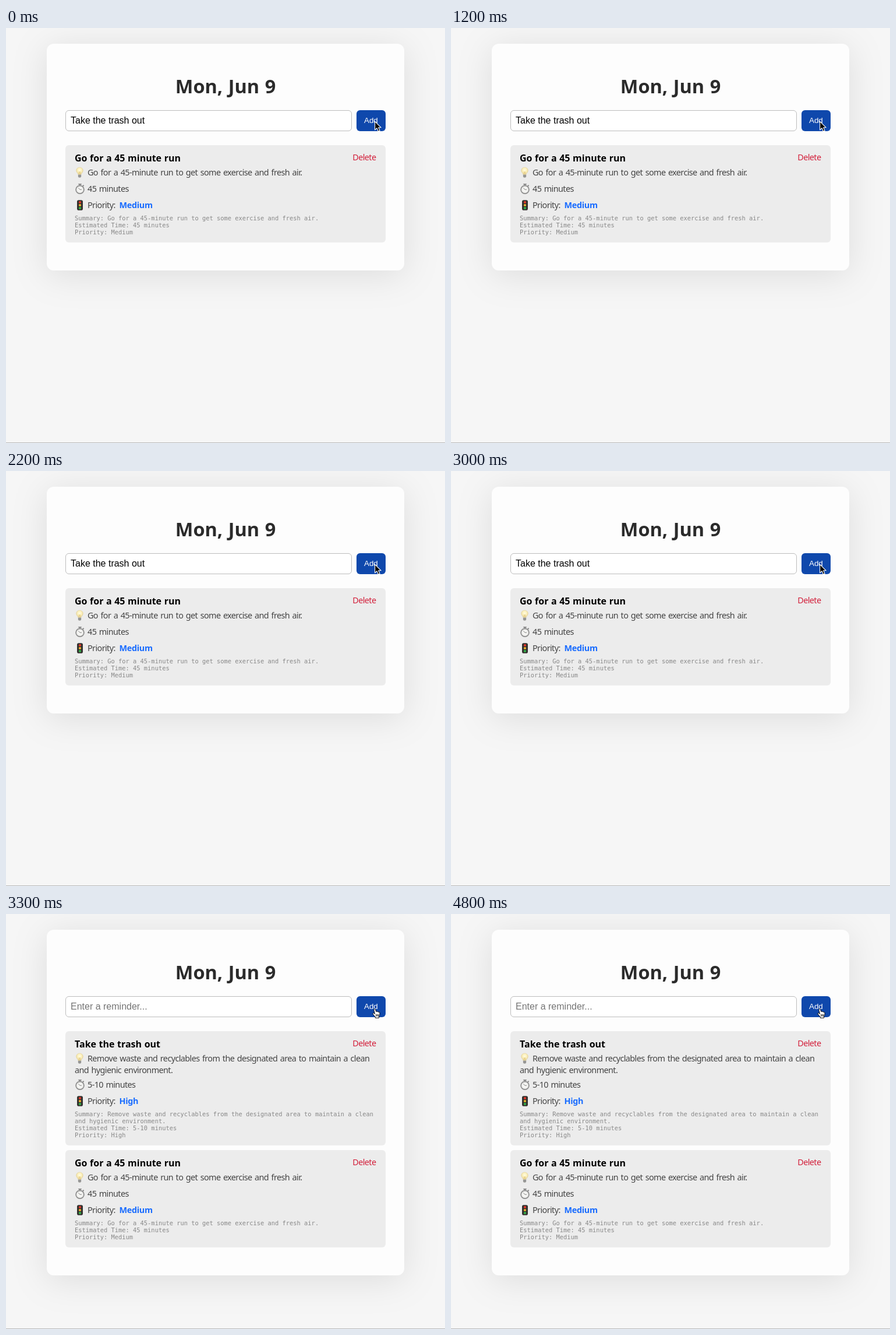
Animation of 754 by 712 pixels, one loop 4900 ms. Source, as an HTML page:

```html
<!DOCTYPE html>
<html lang="en">
<head>
<meta charset="utf-8">
<title>Reminders</title>
<style>
html, body { margin: 0; width: 100%; height: 100%; overflow: hidden; background: #f6f6f6; }
svg { display: block; width: 754px; height: 712px; }
text { font-family: "Noto Sans", sans-serif; }
.date { font-size: 32.5px; font-weight: 700; fill: #2b2b2b; word-spacing: .033em; text-anchor: middle; }
.title { font-size: 16px; font-weight: 700; word-spacing: .4px; }
.body, .delete { font-size: 14.4px; fill: #444; letter-spacing: -.042em; word-spacing: .095em; }
.delete { fill: #d3213c; }
.level { font-size: 14.4px; font-weight: 700; fill: #196cff; letter-spacing: -.022em; }
.raw { font: 10.4px "DejaVu Sans Mono", monospace; fill: #888; }
.field, .placeholder { font: 16px "Liberation Sans", Arial, sans-serif; }
.placeholder { fill: #757575; }
.add { font: 13.33px "Liberation Sans", Arial, sans-serif; fill: #fff; }
.card { fill: #fdfdfd; filter: drop-shadow(0 8px 30px rgba(0, 0, 0, .1)); }
</style>
</head>
<body>
<svg id="stage" viewBox="0 0 754 712">
  <defs>
    <radialGradient id="glow" cy=".4">
      <stop offset="0" stop-color="#fffbe0"/>
      <stop offset=".6" stop-color="#fcf1bd"/>
      <stop offset="1" stop-color="#ead9a0"/>
    </radialGradient>
    <g id="bulb">
      <path d="M5.8 12.5C5.6 9.8 2.6 8.8 2.6 5.2a5.9 5.2 0 0 1 11.8 0C14.4 8.8 11.4 9.8 11.2 12.5Z" fill="url(#glow)" stroke="#dfcf9c" stroke-width=".5"/>
      <path d="M7.5 12V7.5l1 1 1-1V12" fill="none" stroke="#d9b860" stroke-width=".6"/>
      <path d="M5.9 12.5h5.2v3.6l-1.2 1.7H7.1l-1.2-1.7Z" fill="#a5a5a2"/>
      <path d="M5.9 14h5.2M5.9 15.7h5.2" stroke="#777" stroke-width=".6"/>
    </g>
    <g id="watch">
      <path d="M9 3V1M14 4.2l1.6-1.4" stroke="#858585" stroke-width="2"/>
      <path d="M6.8.9h4.4" stroke="#777" stroke-width="1.5" stroke-linecap="round"/>
      <circle cx="9" cy="10.2" r="6.9" fill="#f5f5f3" stroke="#8b8b8b" stroke-width="1.7"/>
      <circle cx="9" cy="10.2" r="5" fill="none" stroke="#aaa" stroke-width=".8" stroke-dasharray=".6 2.02"/>
      <path d="M9 10.2 6.2 7.4M9 10.2h3" stroke="#666" stroke-width=".8"/>
    </g>
    <g id="light">
      <rect x="4" y=".3" width="10" height="17.4" rx="2.8" fill="#34322f"/>
      <circle cx="9" cy="4" r="2.1" fill="#e8392b"/>
      <circle cx="9" cy="9" r="2.1" fill="#f0b52e"/>
      <circle cx="9" cy="14" r="2.1" fill="#35b54a"/>
    </g>
  </defs>
  <rect width="754" height="712" fill="#f6f6f6"/>
  <rect y="711" width="754" height="1" fill="#b8b8b8"/>
  <g id="before"></g>
  <g id="after"></g>
  <text class="date" x="377" y="112">Mon, Jun 9</text>
  <rect id="button" x="602" y="141" width="50" height="36" rx="6" fill="#0f48ac"/>
  <text class="add" x="615" y="163">Add</text>
  <path id="arrow" d="M633.6 160.3V174.8L637 171.7 639.3 177.3 642 176.2 639.7 170.8H644.2Z" fill="#000" stroke="#fff" stroke-width="1.1" stroke-linejoin="round"/>
  <path id="hand" d="M632 163.6c.9-1.4 2.4-.7 2.7.5l.9 3.5c.7-.9 2-.7 2.3.3.8-.6 1.9-.3 2.1.6 1-.4 2 .2 2 1.3 0 2.7-.5 4.1-1.4 5.6v2.9h-6.3v-1.6c-1.4-1.6-2.5-3.2-4.1-5-.9-1.2.5-2.5 1.9-1.5l1.4 1.2-1.6-6.3c-.1-.6-.1-1.1.1-1.5ZM635.7 172v3.6M637.6 172v3.6M639.5 172v3.6" fill="#fff" stroke="#000" stroke-width=".95" stroke-linejoin="round"/>
</svg>
<script>
const LOOP = 4900;
const $ = id => document.getElementById(id);

const text = (cls, x, y, str) => `<text class="${cls}" x="${x}" y="${y}">${str}</text>`;
const icon = (name, y) => `<use href="#${name}" x="118" y="${y}"/>`;
const box = (x, y, w, h, attrs) => `<rect x="${x}" y="${y}" width="${w}" height="${h}" ${attrs}/>`;

const run = {
  title: "Go for a 45 minute run",
  summary: ["Go for a 45-minute run to get some exercise and fresh air."],
  time: "45 minutes", level: "Medium", height: 167, timeY: 80, rawY: 129
};
const trash = {
  title: "Take the trash out",
  summary: ["Remove waste and recyclables from the designated area to maintain a clean",
            "and hygienic environment."],
  time: "5-10 minutes", level: "High", height: 196, timeY: 97, rawY: 146
};

function item(task, y) {
  const { title, summary, time, level, height, timeY, rawY } = task;
  const ty = y + timeY, py = ty + 28;
  const raw = [...summary, `Estimated Time: ${time}`, `Priority: ${level}`];
  raw[0] = "Summary: " + raw[0];
  return box(102, y, 550, height, 'rx="6" fill="#ececec"')
    + text("title", 118, y + 28, title)
    + text("delete", 595.3, y + 26, "Delete")
    + icon("bulb", y + 38)
    + summary.map((s, i) => text("body", i ? 118 : 140, y + 52 + 20 * i, s)).join("")
    + icon("watch", ty - 14) + text("body", 140, ty, time)
    + icon("light", py - 14) + text("body", 140, py, "Priority:") + text("level", 194.5, py, level)
    + raw.map((s, i) => text("raw", 118, y + rawY + 12 * i, s)).join("");
}

function page(height, cls, value, items) {
  return box(70, 27, 614, height, 'rx="12" class="card"')
    + box(102.5, 141.5, 491, 35, 'rx="5.5" fill="#fff" stroke="#bdbdbd"')
    + text(cls, 111, 164, value) + items;
}

$("before").innerHTML = page(389, "field", "Take the trash out", item(run, 201));
$("after").innerHTML = page(593, "placeholder", "Enter a reminder...", item(trash, 201) + item(run, 405));

// Hold each value until the next time in the table.
function hold(id, prop, table) {
  const frames = table.map(([ms, v]) => ({ offset: ms / LOOP, [prop]: v, easing: "step-end" }));
  frames.push({ offset: 1, [prop]: table[table.length - 1][1] });
  $(id).animate(frames, { duration: LOOP, iterations: Infinity });
}

const ADDED = 3100;
for (const id of ["before", "arrow"]) hold(id, "opacity", [[0, 1], [ADDED, 0]]);
for (const id of ["after", "hand"]) hold(id, "opacity", [[0, 0], [ADDED, 1]]);
hold("button", "fill", [[0, "#0f48ac"], [ADDED, "#196cff"], [ADDED + 100, "#1150bd"], [ADDED + 200, "#0f48ac"]]);
</script>
</body>
</html>
```
